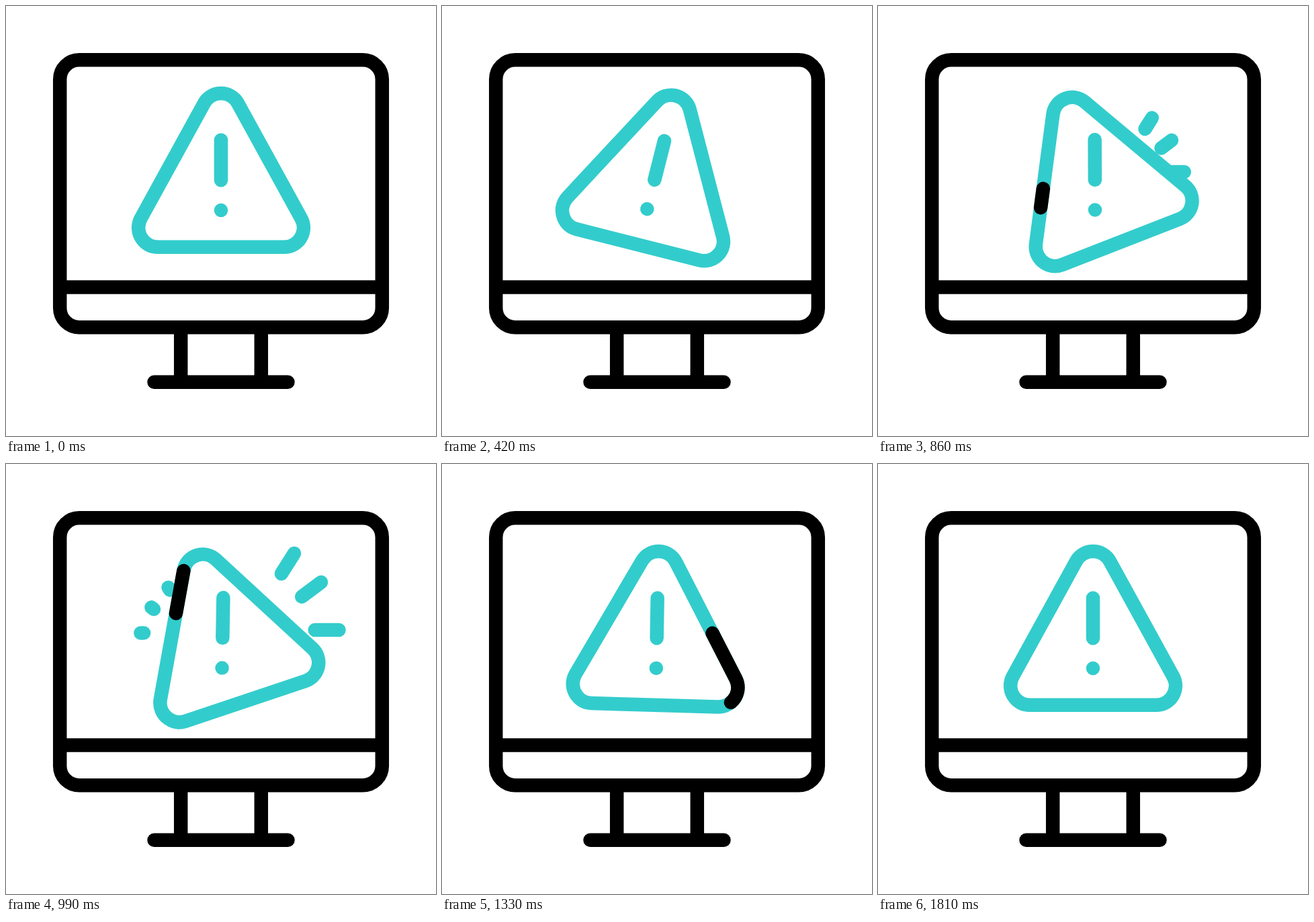
An HTML page for the animation above (2.11 s loop, 640 px wide and 640 px high).

```html
<!DOCTYPE html>
<html lang="en">
<head>
<meta charset="utf-8">
<title>Warning on a monitor</title>
<style>
  html, body { margin: 0; width: 100%; height: 100%; overflow: hidden; background: #fff; }
  svg { display: block; width: 100vw; height: 100vh; }
  .line { fill: none; stroke: #000; stroke-width: 20.5; }
  .round { stroke-linecap: round; }
  .teal { stroke: #33cccc; }
</style>
</head>
<body>
<svg viewBox="0 0 640 640">
  <defs>
    <path id="outline" pathLength="1" d="M203.1 347.5A28.8 28.8 0 0 1 200.7 316.1L294.7 145.1A28.8 28.8 0 0 1 345.3 145.1L439.3 316.1A28.8 28.8 0 0 1 414 358.8H226A28.8 28.8 0 0 1 203.1 347.5Z"/>
    <g id="fan">
      <path pathLength="1" d="M397.5 183L429 133"/>
      <path pathLength="1" d="M421.5 211.5L469 176"/>
      <path pathLength="1" d="M436.5 247H495.5"/>
    </g>
  </defs>
  <g class="line">
    <rect x="80.2" y="80.2" width="479.6" height="398.1" rx="28.8"/>
    <path d="M80 418.4H560M260.2 478V560M379.8 478V560"/>
    <path class="round" d="M220.5 559.7H419.5"/>
  </g>
  <g class="line round teal">
    <use href="#fan" id="right"/>
    <use href="#fan" id="left" transform="translate(641.5 4.6) scale(-1 1)"/>
  </g>
  <g id="sign" class="line round">
    <use href="#outline" class="teal"/>
    <g id="mark" class="teal">
      <path d="M320 199.5V259.2"/>
      <path d="M320 304V304.01"/>
    </g>
    <use href="#outline" id="dash"/>
  </g>
</svg>
<script>
const LOOP = 2110, STEP = LOOP / 49;
const $ = id => document.getElementById(id);

// Key points: [step, degrees]
const SWING = [[4, 0], [15, 25], [21, -25], [28, 7.5], [35, -7.4], [42, 0]];
const COUNTER = [[17, 0], [21, 25], [28, -2.5], [35, 2.2], [42, 0]];

function ease(u) {
  u = Math.min(1, Math.max(0, u));
  return u * u * (3 - 2 * u);
}

// Eased moves add up, one for each pair of key points
function angle(keys, n) {
  return keys.slice(1).reduce((sum, [to, deg], i) => {
    const [from, before] = keys[i];
    return sum + (deg - before) * ease((n - from) / (to - from));
  }, 0);
}

function trim(el, from, to, shown) {
  el.style.visibility = shown ? "visible" : "hidden";
  el.style.strokeDasharray = `${Math.max(0.0005, to - from)} 3`;
  el.style.strokeDashoffset = -from;
}

function burst(el, age) {
  const front = ease(age / 4.7), back = ease((age - 2.4) / 5.6);
  trim(el, back, front, age > 0 && back < 1);
}

function draw(ms) {
  const n = Math.floor((ms + 13) / STEP);

  $("sign").setAttribute("transform", `rotate(${angle(SWING, n)} 320 244.2)`);
  $("mark").setAttribute("transform", `rotate(${angle(COUNTER, n)} 320 252)`);

  const u = (n - 16.85) / 20.5;
  const length = u * (1 - u) * (0.17 + 0.78 * u);
  trim($("dash"), u - length, u, u > 0 && u < 1);

  burst($("right"), n - 18.2);
  burst($("left"), n - 22.2);
}

const begin = performance.now();
function tick() {
  draw((performance.now() - begin) % LOOP);
  requestAnimationFrame(tick);
}
tick();
</script>
</body>
</html>
```
